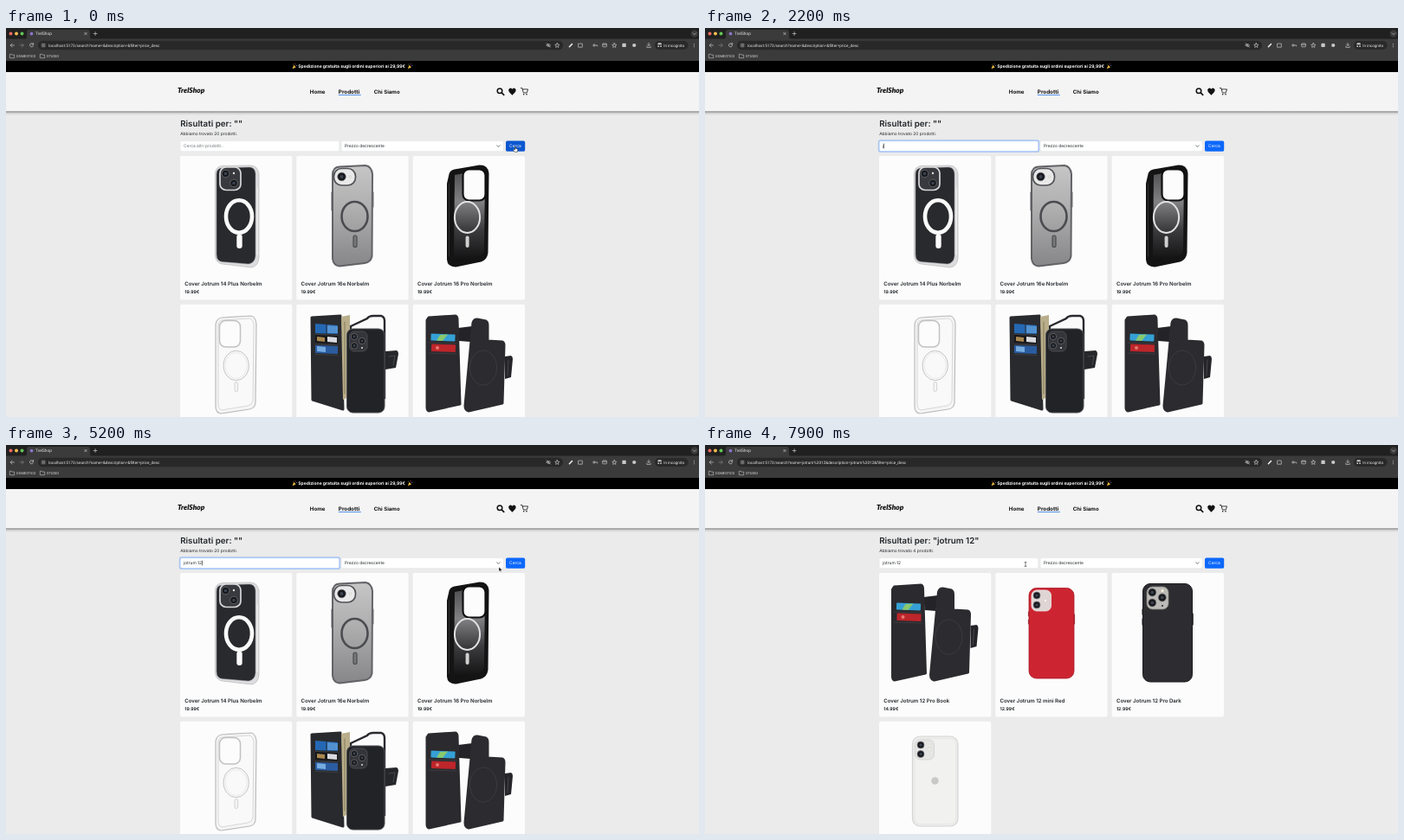
Recreate the animation shown at these times as an HTML page. Size 800x450 px, loop 8000 ms.

```html
<!DOCTYPE html>
<html lang="it">
<head>
<meta charset="utf-8">
<title>TrelShop</title>
<style>
  html, body { margin: 0; width: 100%; height: 100%; overflow: hidden; background: #ebebeb; }
  svg { display: block; width: 800px; height: 450px; font-family: Inter, sans-serif; }
  text { white-space: pre; text-rendering: geometricPrecision; }
  .chrome { font-family: Roboto, sans-serif; }
</style>
</head>
<body>
<svg id="stage" viewBox="0 0 800 450" xmlns="http://www.w3.org/2000/svg"></svg>
<script>
const LOOP = 8000, CLICK = 6650, LOADED = 6850;
const INK = '#212529', BLUE = '#0c68fb', BODY = 4.86;

// Markup helpers
const rect = (x, y, w, h, rx, fill, more = '') =>
  `<rect x="${x}" y="${y}" width="${w}" height="${h}" rx="${rx}" fill="${fill}" ${more}/>`;
const oval = (cx, cy, rx, ry, fill, more = '') =>
  `<ellipse cx="${cx}" cy="${cy}" rx="${rx}" ry="${ry}" fill="${fill}" ${more}/>`;
const dot = (x, y, r, fill, more) => oval(x, y, r, r, fill, more);
const path = (d, fill, more = '') => `<path d="${d}" fill="${fill}" ${more}/>`;
const line = (d, color, width) =>
  path(d, 'none', `stroke="${color}" stroke-width="${width}" stroke-linecap="round" stroke-linejoin="round"`);
const stroke = (color, width) => `stroke="${color}" stroke-width="${width}"`;
const text = (x, y, size, str, fill = INK, weight = 400, more = '') =>
  `<text x="${x}" y="${y}" font-size="${size}" fill="${fill}" font-weight="${weight}" ${more}>${str}</text>`;
const group = (body, more = '') => `<g ${more}>${body}</g>`;

const lens = (x, y, r) =>
  dot(x, y, r, '#17181b', stroke('#77787c', .7)) + dot(x, y, r * .4, '#3c4454');
const magnet = (x, y, rx, ry, color, width) => oval(x, y, rx, ry, 'none', stroke(color, width));
const shape = (d, fill) => path(d, fill, `stroke="${fill}" stroke-width="3" stroke-linejoin="round"`);

// Product pictures, placed in stage coordinates
const clearBlackPhone = () =>
  path('M250 159.5L282 159Q290 159 292 168L292 266Q291 276 283 277L250 273Q242 272 241.5 263V168Q242 160 250 159.5Z', '#dcdcde', stroke('#b9b9bc', .7)) +
  path('M250 162L281 161Q287 161 288 168L288 264Q287 272 280 273L250 270.5Q243 270 243 262V169Q243 162 250 162Z', '#292a2e', stroke('#8e8f92', .5)) +
  line('M290.3 185V262', '#f4f4f4', 1) +
  rect(247, 161, 24, 26.5, 7, '#393a3f', stroke('#d9d9db', 1.7)) +
  lens(253.5, 168.5, 4.3) + lens(263, 179.5, 4.3) + dot(263, 168, 1.2, '#e5e2d6') +
  magnet(269, 218, 15, 18.8, '#fafafa', 4.6) + rect(266.3, 238.5, 6.4, 16.5, 3, '#fafafa');

const grayPhone = () =>
  path('M385 160.5L415 159Q422 160 423 169L422.5 264Q421 271 414 272L385 275.5Q378 275 377 267V170Q377 161 385 160.5Z', 'url(#smoke)', stroke('#626366', 2)) +
  line('M375.9 190V211M424 190V207', '#505154', .8) +
  rect(378.5, 162.5, 25, 19.5, 9, '#e9e9ea', stroke('#515255', 1.7)) +
  lens(387.5, 172, 4.8) + dot(397.5, 172, 1.3, '#f9f5e4', stroke('#bbb', .5)) +
  magnet(402.5, 218, 15, 17, '#4b4c4f', 2.6) +
  rect(401, 240, 4, 13.5, 2, '#77787a', stroke('#4b4c4f', 1.2));

const blackCase = () =>
  shape('M513 169Q514 166 518 165L547 160Q555 160 556 168L555 260Q554 267 548 269L519 275Q511 275 510.5 268V180Z', '#141415') +
  path('M518 170L550 164Q553 165 553 169L552 257Q551 262 546 264L521 270Q517 269 517 264Z', 'url(#night)') +
  rect(527.5, 163.5, 26, 36, 7, '#fcfcfc', stroke('#101011', 2.2)) +
  line('M511.5 180V264', '#4a4a4c', .6) +
  magnet(532.5, 219, 14.6, 18, '#e2e2e3', 2) + rect(530.6, 240.5, 4, 13.5, 2, '#d0d0d1');

const clearCase = () =>
  path('M249 335L283 333Q288 334 289 342L288 434Q287 440 281 441L248 446Q242 445 242 438V343Q243 336 249 335Z', '#f5f5f6', stroke('#bcbcbf', 1.2)) +
  path('M250 338L281 336Q285 337 286 343L285 431Q284 436 279 437L249 442Q245 441 245 436V344Q246 338 250 338Z', '#f9f9f9', stroke('#d0d0d2', .8)) +
  rect(246.5, 338.5, 24, 30.5, 7, '#fcfcfc', stroke('#c1c1c4', 1.5)) +
  magnet(265.7, 390.5, 14.6, 17.2, '#bdbdc0', .9) + magnet(265.7, 390.5, 12.6, 15, '#dddddf', .6) +
  rect(264, 409.5, 3.6, 11, 1.8, '#f4f4f4', stroke('#c4c4c6', .7));

const wallet = () =>
  path('M398 345L417 336Q419 333 424 333L433 333Q437 334 437 339V428L398 436Z', '#fafafa', stroke('#292a2e', 2.4)) +
  shape('M353 335L386 333L389 441L354 430Z', '#292a2e') +
  path('M387 334L397 332L397 426L389 430Z', '#b9ae8a') +
  line('M391 340V423', '#8c8464', 1.2) +
  path('M357 342L383 344V354L357 353Z', '#2468b4') + path('M371 344L383 345V353L371 353Z', '#5291cf') + line('M370 343V353', '#292a2e', 1) +
  path('M357 355L383 356V365L357 364Z', '#17181a') + path('M359 357L368 358V363L359 362Z', '#a98751') + path('M371 357L382 358V364L371 363Z', '#d8dbe0') +
  path('M357 367L383 368V377L357 376Z', '#2a5ca0') + path('M359 368L369 369V375L359 374Z', '#76abe0') +
  line('M357 354.5L383 355.5M357 366L383 367M357 377.5L383 378.5', '#46474b', .7) +
  path('M438 374L451 373Q453 374 453 377L450 393L438 395Z', '#26272a') + line('M442 380L449 379L447 390', '#55565a', .7) +
  rect(393.5, 348, 43.5, 97, 7, '#222326', stroke('#505157', 1)) +
  rect(396.5, 351, 20.5, 23, 5.5, '#34353a', stroke('#606168', .6)) +
  lens(402, 357, 3.7) + lens(402, 367.5, 3.7) + lens(411, 362, 3.7) + dot(411, 370, 1, '#ddd');

const bookCase = () =>
  path('M522 347L538 345L536 363L523 362Z', '#242327') +
  shape('M488 335L519 333Q521 334 521 337L524 435L488 443Q486 442 486 439V338Z', '#2b2a2e') +
  shape('M539 341Q540 337 544 337L554 339Q556 340 556 344V362L573 363Q575 364 575 367L573 434L534 443Q530 442 530 437Z', '#2c2b2f') +
  rect(490.5, 354, 28, 8, .8, '#35a1d5', 'transform="rotate(2 504 358)"') +
  path('M501 355L510 354.5L504 362L497 361.5Z', '#88c86e') +
  rect(491, 366, 28, 8.5, .8, '#bd262b', 'transform="rotate(2 505 370)"') +
  dot(498, 370, 2, '#e77872') +
  line('M488 364L520 365M488 376L520 377', '#454448', .7) +
  magnet(551, 393, 15.5, 20, '#47464a', .6) +
  path('M576 380L583 379Q585 380 585 383L583 404L576 406Z', '#252428') + line('M580 384L579 402', '#56555a', .7);

const redPhone = () =>
  rect(374, 165.5, 52, 104.5, 8.5, '#cc2531', stroke('#a91a27', .8)) +
  rect(377, 168, 22.5, 24, 6, '#ded5d4', stroke('#f1eaea', .8)) +
  lens(383, 174, 4) + lens(383, 185, 4) + dot(393, 180, 1.8, '#fff8ec', stroke('#bbb', .4)) +
  line('M373.4 193V198M373.4 202V207M426.6 196V207', '#941a24', .9);

const darkPhone = () =>
  rect(505.5, 160.5, 57, 113.5, 8.5, '#2d2d31', stroke('#1c1c20', 1)) +
  rect(510, 164, 25, 26, 6.5, '#bdbbb8', stroke('#85847f', .8)) +
  lens(516.3, 170.5, 4.5) + lens(516.3, 182.5, 4.5) + lens(527.8, 176.5, 4.5) +
  dot(528, 168.5, 1.5, '#fff5dc') + dot(528, 186, 1.1, '#2c2c2e') +
  line('M505 190V196M505 201V208M563.2 195V208', '#111114', 1);

const whitePhone = () =>
  rect(239.5, 337, 52.5, 104, 9, '#ededec', stroke('#d5d5d5', 1.2)) +
  rect(242, 339.5, 47.5, 99, 7, '#f1f1f0', stroke('#e3e3e3', .6)) +
  rect(242.5, 341, 22, 23, 6, '#e5e5e4', stroke('#d0d0d0', .8)) +
  lens(249, 347, 4) + lens(249, 357.5, 4) + dot(259, 352, 1.6, '#fffbea', stroke('#c8c8c8', .5)) +
  dot(265.5, 388.5, 4.2, '#c9c9c9');

// Page parts
const cardX = [201, 335.3, 469.7];
const card = (column, row, picture, title, price) => {
  const x = cardX[column], y = 148 + row * 171.7;
  return rect(x, y, 129.3, 166.6, 1.8, '#fcfcfc') + picture +
    text(x + 5.2, y + 149.9, 6.1, title, INK, 600) + text(x + 5.2, y + 159.2, 5.1, price, INK, 700);
};

const popper = x => path(`M${x} 47.2L${x + 1.8} 42.8L${x + 4.2} 45.4Z`, '#e9b83f') +
  dot(x + 3.4, 41.8, .55, '#dd4b78') + dot(x + 5, 43.5, .5, '#579de0') + dot(x + .8, 42, .4, '#9fcc57');

const folder = x => line(`M${x} 30.3h1.8l.7.8h2.5v3.6h-5z`, '#c7c7c7', .6);

const toolbar = () => {
  const c = '#c9c9c9', thin = d => line(d, c, .7);
  return rect(0, 0, 800, 13.5, 0, '#202021') + rect(0, 12.5, 800, 25.8, 0, '#3b3b3c') +
    path('M21 13Q24 13 24 10V4.5Q24 2 26.5 2H94Q97 2 97 4.5V10Q97 13 100 13Z', '#3b3b3c') +
    dot(5.5, 6.5, 2, '#ee6a5f') + dot(12, 6.5, 2, '#f5bf4f') + dot(18.5, 6.5, 2, '#62c554') +
    dot(29.5, 6.6, 1.9, '#8d74c9') + text(34, 8.3, 4.8, 'TrelShop', '#e3e3e3') +
    dot(794.8, 6.5, 4.2, '#3b3b3c') +
    thin('M90.7 5.3l2.5 2.5m0-2.5l-2.5 2.5M101.2 6.5h3.8M103.1 4.6v3.8M793 5.8l1.8 1.8 1.8-1.8') +
    thin('M9.5 20H5.2m2-2l-2 2 2 2') + line('M16 20h4.3m-2-2l2 2-2 2', '#818181', .7) +
    thin('M31.3 18.6a2.1 2.1 0 1 0 .2 2M31.6 17.4v1.8h-1.8') +
    rect(37, 14.8, 606, 10.4, 5.2, '#282829') +
    dot(43.2, 20, 3.3, '#3b3b3c') + thin('M41.7 19h3M41.7 21h3') +
    thin('M624 20q2.3-3 4.6 0q-2.3 3-4.6 0M624.2 17.8l4.2 4.4') + dot(626.3, 20, .7, c) +
    thin('M636.3 17.5l.8 1.7 1.8.2-1.4 1.2.4 1.8-1.6-.9-1.6.9.4-1.8-1.4-1.2 1.8-.2z') +
    line('M650.4 21.8l3.1-3.3', '#f0f0f0', 1.5) +
    thin('M661 18.2h1.3q.8-1.4 1.6 0h1.4v4h-4.3z') +
    thin('M680.4 20h2.3v1') + dot(678.9, 20, 1.1, 'none', stroke(c, .8)) +
    rect(688.7, 18, 4.7, 3.8, .6, 'none', stroke(c, .7)) + thin('M689 19.2h4') +
    thin('M702.3 17.5l.8 1.7 1.8.2-1.4 1.2.4 1.8-1.6-.9-1.6.9.4-1.8-1.4-1.2 1.8-.2z') +
    rect(711.4, 17.8, 4.3, 4.3, .6, c) + dot(725.2, 20, 2.1, c) +
    thin('M742 17.3v3m-1.5-1.3l1.5 1.5 1.5-1.5M739.8 21.2v1.2h4.4v-1.2') +
    rect(749, 15, 38.5, 10, 5, '#292929') +
    path('M752 19.3h5.2l-1-2h-3.2z', c) + dot(753.2, 21.2, .9, c) + dot(756, 21.2, .9, c) +
    text(759.3, 21.6, 4.55, 'In incognito', '#e8e8e8') +
    [18.2, 20, 21.8].map(y => dot(794.3, y, .5, c)).join('') +
    folder(4.7) + text(12, 34.2, 4, 'DOMESTICO', '#d8d8d8') +
    folder(39.7) + text(47, 34.2, 4.1, 'STUDIO', '#d8d8d8') +
    text(49, 21.6, 4.68, '', '#e6e6e6', 400, 'id="url"');
};

const header = () =>
  rect(0, 95, 800, 6, 0, 'url(#shade)') + rect(0, 51, 800, 45.3, 0, '#f4f4f4') +
  rect(0, 38, 800, 13, 0, '#000') +
  popper(330.5) + text(337.3, 46.4, 5.02, 'Spedizione gratuita sugli ordini superiori ai 29,99€', '#fff', 700) + popper(463.8) +
  text(198, 75.3, 8.4, 'TrelShop', '#0b0b0b', 900, 'font-style="italic" font-family="Lato, sans-serif"') +
  text(350.8, 75.6, 6.2, 'Home', '#111', 700) + text(383.8, 75.6, 6.3, 'Prodotti', '#111', 700) +
  text(424.8, 75.6, 6.1, 'Chi Siamo', '#111', 700) + rect(383.8, 77, 26, .8, 0, '#2d7bea') +
  dot(570, 72.7, 2.8, 'none', stroke('#111', 1.5)) + line('M572.4 75.1l2.3 2.3', '#111', 1.7) +
  path('M584.4 77.8L580.8 74Q579.2 71.8 581 70.1Q582.9 68.7 584.4 70.7Q585.9 68.7 587.8 70.1Q589.6 71.8 588 74Z', '#111') +
  line('M594.3 69.4h1.5l1.5 5.5h4l1.2-4h-6.2', '#111', .8) + dot(597.7, 76.8, .8, '#111') + dot(601, 76.8, .8, '#111');

const searchBar = () =>
  rect(199.8, 129.3, 186.4, 14.7, 2.7, BLUE, 'id="glow"') +
  rect(201.2, 130.7, 183.5, 11.9, 1.8, '#fff', `id="field" ${stroke('#dee2e6', .4)}`) +
  text(205, 138.2, BODY, 'Cerca altri prodotti...', '#6b6f73', 400, 'id="placeholder"') +
  text(205, 138.2, BODY, '', INK, 400, 'id="typed"') + rect(0, 133.6, .55, 5.8, 0, '#000', 'id="caret"') +
  rect(387.2, 130.7, 187, 11.9, 1.8, '#fff', stroke('#dee2e6', .4)) +
  text(391, 138.2, BODY, 'Prezzo decrescente') + line('M566.6 135.8l1.7 1.7 1.7-1.7', '#343a40', .7) +
  rect(577, 130.5, 22.2, 12.3, 1.9, BLUE, 'id="button"') + text(581.1, 138.3, BODY, 'Cerca', '#fff');

const gradient = (id, x2, y2, ...stops) =>
  `<linearGradient id="${id}" x2="${x2}" y2="${y2}">` + stops.map(([at, color]) =>
    `<stop offset="${at}" stop-color="${color}"/>`).join('') + '</linearGradient>';

document.getElementById('stage').innerHTML =
  '<defs>' + gradient('smoke', 0, 1, [0, '#c6c6c7'], [.45, '#adadae'], [1, '#868688']) +
  gradient('night', 0, 1, [0, '#4c4c4e'], [.35, '#818183'], [.65, '#3c3c3e'], [1, '#101011']) +
  gradient('shade', 0, 1, [0, '#7c7c7c'], [.3, '#909090'], [.6, '#d3d3d3'], [1, '#ebebeb']) + '</defs>' +
  rect(0, 0, 800, 450, 0, '#ebebeb') + group(toolbar(), 'class="chrome"') + header() +
  text(201.2, 113.6, 9.75, '', INK, 600, 'id="heading"') + text(201.2, 123.7, BODY, '', INK, 400, 'id="count"') +
  searchBar() +
  group(
    card(0, 0, clearBlackPhone(), 'Cover Jotrum 14 Plus Norbelm', '19.99€') +
    card(1, 0, grayPhone(), 'Cover Jotrum 16e Norbelm', '19.99€') +
    card(2, 0, blackCase(), 'Cover Jotrum 16 Pro Norbelm', '19.99€') +
    card(0, 1, clearCase(), '', '') + card(1, 1, wallet(), '', '') + card(2, 1, bookCase(), '', ''), 'id="all"') +
  group(
    card(0, 0, group(bookCase(), 'transform="translate(-269.5 -171)"'), 'Cover Jotrum 12 Pro Book', '14.99€') +
    card(1, 0, redPhone(), 'Cover Jotrum 12 mini Red', '12.99€') +
    card(2, 0, darkPhone(), 'Cover Jotrum 12 Pro Dark', '12.99€') +
    card(0, 1, whitePhone(), '', ''), 'id="found"') +
  group(
    group(path('M0 0V5.3L1.3 4.2L2.1 6L3 5.6L2.2 3.9H3.8Z', '#000', stroke('#fff', .5)), 'id="arrow"') +
    group(path('M-.5 -2.8Q0-3.4.5-2.8V-.5L2.4 0Q3 .3 2.8 1.2L2.2 3.4H-.8L-2.5 1Q-2-.1-.5.8Z', '#fff', stroke('#111', .5)), 'id="hand"') +
    group(line('M-1-2.6Q0-2.6 0-1.9Q0-2.6 1-2.6M0-1.9V1.9M-1 2.6Q0 2.6 0 1.9Q0 2.6 1 2.6', '#222', .6), 'id="beam"'),
    'id="cursor"');

const el = id => document.getElementById(id);
const show = (id, on) => el(id).setAttribute('visibility', on ? 'inherit' : 'hidden');
const write = (id, str) => { if (el(id).textContent !== str) el(id).textContent = str; };

const query = 'jotrum 12';
const keyTimes = [2150, 2600, 2800, 2900, 3100, 3200, 4000, 4500, 4750];
const track = [[0, 588, 140], [100, 588, 140], [700, 329, 141], [900, 329, 141], [1500, 304, 138],
  [4880, 304, 138], [5200, 569, 141], [5500, 583, 141], [6900, 583, 141], [7500, 370, 138], [LOOP, 370, 138]];

function cursorAt(t) {
  const i = track.findIndex(point => point[0] > t);
  const [t0, x0, y0] = track[i - 1], [t1, x1, y1] = track[i];
  const p = (t - t0) / (t1 - t0), ease = p * p * (3 - 2 * p);
  return [x0 + (x1 - x0) * ease, y0 + (y1 - y0) * ease];
}

function draw(t) {
  const loaded = t >= LOADED, focused = t >= 1650 && t < CLICK + 50;
  const typed = query.slice(0, keyTimes.filter(k => k <= t).length);
  const term = loaded ? query : '', param = encodeURIComponent(term);

  write('url', `localhost:5173/search?name=${param}&description=${param}&filter=price_desc`);
  write('heading', `Risultati per: "${term}"`);
  write('count', `Abbiamo trovato ${loaded ? 4 : 20} prodotti.`);
  write('typed', typed);
  show('placeholder', !typed);
  show('all', !loaded);
  show('found', loaded);

  const fadeIn = Math.min(1, Math.max(0, (t - 1650) / 150));
  const fadeOut = Math.min(1, Math.max(0, (t - CLICK - 50) / 150));
  const glow = fadeIn * (1 - fadeOut);
  el('glow').setAttribute('opacity', glow * .27);
  el('field').setAttribute('stroke', glow > .5 ? '#86b7fe' : '#dee2e6');

  const lastInput = Math.max(1650, ...keyTimes.filter(k => k <= t));
  show('caret', focused && (t - lastInput) % 1000 < 500);
  el('caret').setAttribute('x', 205.2 + (typed ? el('typed').getComputedTextLength() : 0));

  const [x, y] = cursorAt(t);
  const onButton = x >= 577 && x <= 599, onField = x >= 201 && x <= 385;
  el('cursor').setAttribute('transform', `translate(${x} ${y})`);
  show('cursor', t < keyTimes[0] || t >= 4880);
  show('hand', onButton);
  show('beam', onField);
  show('arrow', !onButton && !onField);
  const pressed = t >= CLICK && t < CLICK + 100;
  el('button').setAttribute('fill', pressed ? '#0a58ca' : onButton ? '#0b57d0' : BLUE);
}

function tick() {
  draw(performance.now() % LOOP);
  requestAnimationFrame(tick);
}
tick();
</script>
</body>
</html>
```
